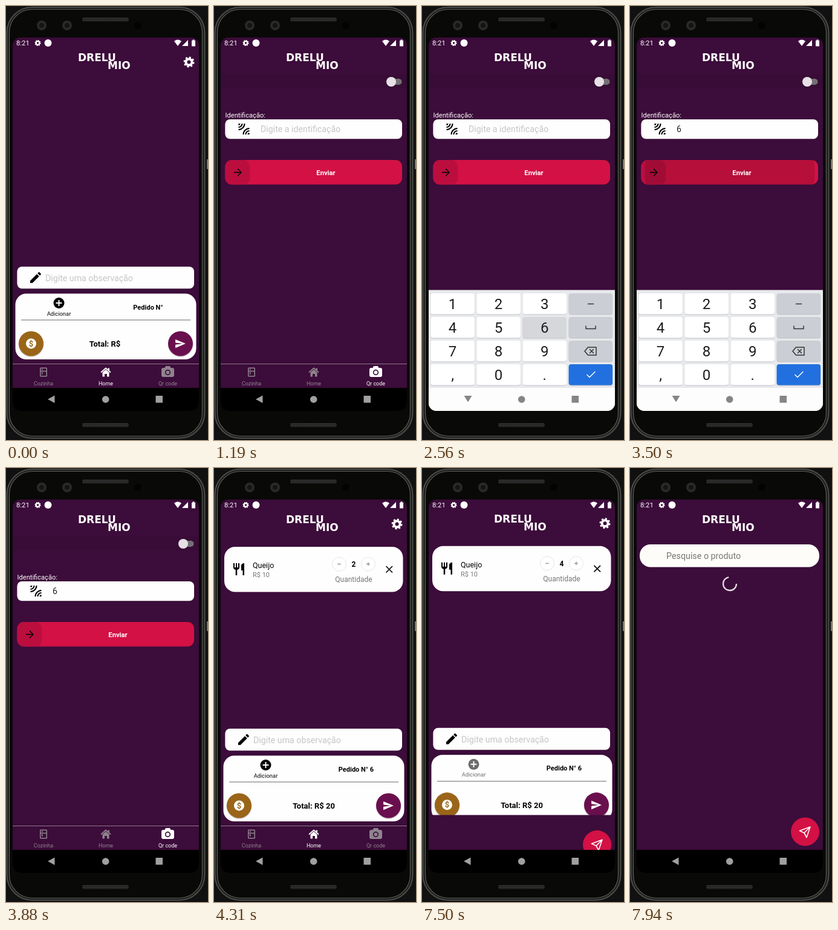
Animation of 334x716 px, one loop 8 s. Source, as an HTML page:

```html
<!DOCTYPE html>
<html lang="pt">
<head>
<meta charset="utf-8">
<title>Pedido</title>
<style>
html, body { margin: 0; width: 100%; height: 100%; overflow: hidden; background: #111; }
svg { display: block; width: 334px; height: 716px; font-family: Roboto, sans-serif; }
.mid { text-anchor: middle; }
.b { font-weight: 700; }
.hint { font-size: 14.2px; fill: #c6c6c6; }
.tab { font-size: 9px; color: #8f838e; fill: currentColor; }
.logo { font: 700 17px "DejaVu Sans", sans-serif; fill: #fff; }
.line { fill: none; stroke-linecap: round; stroke-linejoin: round; }
</style>
</head>
<body>
<svg viewBox="0 0 334 716">
  <defs>
    <clipPath id="screen"><rect x="11" y="52" width="308" height="616" rx="13"/></clipPath>
    <clipPath id="reveal"><rect id="revealBox" x="11" y="630" width="308" height="578"/></clipPath>
    <clipPath id="button"><rect x="18.500" y="254" width="292.500" height="40.500" rx="11"/></clipPath>
    <pattern id="mesh" width="3" height="3" patternUnits="userSpaceOnUse">
      <rect width="3" height="3" fill="#303030"/><rect width="1.500" height="1.500" fill="#141414"/>
    </pattern>
    <g id="logo" class="logo"><text x="119" y="91">DRELU</text><text x="168" y="104">MIO</text></g>
    <g id="gear" fill="none" stroke="#fff" stroke-width="4">
      <circle r="5"/><circle r="7.500" stroke-width="3" stroke-dasharray="2.945"/>
    </g>
  </defs>

  <rect x="332" y="253" width="2" height="16" fill="#777"/>
  <rect x="1.500" y="2" width="327" height="711" rx="42" fill="#1b1b1a" stroke="#4c4c49" stroke-width="2"/>
  <rect x="5.500" y="5.500" width="319" height="704" rx="38" fill="#090908" stroke="#5e5e5a" stroke-width="1.200"/>
  <rect x="126" y="19" width="77" height="6.500" rx="3" fill="url(#mesh)"/>
  <rect x="126" y="688" width="77" height="6.500" rx="3" fill="url(#mesh)"/>
  <g fill="#2a2a2a"><circle cx="59" cy="32" r="8"/><circle cx="101" cy="32" r="8"/></g>
  <g fill="#151515"><circle cx="59" cy="32" r="4"/><circle cx="101" cy="32" r="4"/></g>
  <circle cx="218" cy="32" r="6" fill="#030303"/>

  <g clip-path="url(#screen)">
    <rect x="11" y="52" width="308" height="616" fill="#3c0c3a"/>
    <g id="main">
      <use id="mainLogo" href="#logo"/>

      <g id="home">
        <use href="#gear" transform="translate(302.500 92.500)"/>
        <g id="item">
          <rect x="17" y="130" width="295.500" height="74.500" rx="18" fill="#fffefe"/>
          <path transform="translate(29 155)" d="M11 9H9V2H7v7H5V2H3v7c0 2.120 1.660 3.840 3.750 3.970V22h2.500v-9.030C11.340 12.840 13 11.120 13 9V2h-2v7zm5-3v8h2.500v8H21V2c-2.760 0-5 2.240-5 4z"/>
          <text x="64" y="165" font-size="12.500">Queijo</text>
          <g fill="#777"><text x="64" y="180" font-size="11">R$ 10</text><text class="mid" x="231" y="188" font-size="12">Quantidade</text></g>
          <g fill="#fff" stroke="#e6e6e6"><circle cx="207" cy="158.500" r="11.500"/><circle cx="255" cy="158.500" r="11.500"/></g>
          <path d="M204 158.500h6" stroke="#777"/>
          <path id="plus" d="M252 158.500h6m-3-3v6" stroke="#777"/>
          <text id="qty" class="b mid" x="231" y="163" font-size="12"></text>
          <path d="m284.500 162 10.500 10.500m0-10.500-10.500 10.500" stroke="#000" stroke-width="1.600"/>
        </g>
        <rect x="18.500" y="430.500" width="292.500" height="36" rx="8" fill="#8d8795"/>
        <rect x="18.500" y="430" width="292.500" height="36" rx="8" fill="#fffefe"/>
        <path transform="translate(37 436)" d="M3 17.250V21h3.750L17.810 9.940l-3.750-3.750L3 17.250zM20.710 7.040a1 1 0 0 0 0-1.410l-2.340-2.340a1 1 0 0 0-1.410 0l-1.830 1.830 3.750 3.750 1.830-1.830z"/>
        <text class="hint" x="65" y="454">Digite uma observação</text>

        <rect x="15.500" y="474.500" width="299" height="108.500" rx="18" fill="#fffefe"/>
        <g id="add">
          <circle cx="87.500" cy="490" r="9"/>
          <path d="M82.500 490h10m-5-5v10" stroke="#fff" stroke-width="2"/>
          <text class="mid" x="87.500" y="510.500" font-size="9.400">Adicionar</text>
        </g>
        <text id="order" class="b mid" x="235" y="500.500" font-size="11"></text>
        <path d="M25 518h280" stroke="#666"/>
        <g fill="#cfc8cc"><circle cx="41.500" cy="558" r="21"/><circle cx="288.500" cy="558" r="21"/></g>
        <circle cx="41.500" cy="557" r="20.500" fill="#9a6518"/>
        <circle cx="41.500" cy="557" r="8.500" fill="#fff"/>
        <text class="b mid" x="41.500" y="561.500" font-size="13" fill="#9a6518">$</text>
        <circle cx="288.500" cy="557" r="20.500" fill="#6a0f4e"/>
        <path transform="translate(278.500 547.500) scale(.8)" fill="#fff" d="M2 21 23 12 2 3v7l15 2-15 2z"/>
        <text id="total" class="b mid" y="562" font-size="13"></text>
      </g>

      <g id="qr">
        <rect x="11" y="113" width="308" height="23" fill="#380c37"/>
        <rect x="287" y="120" width="23.500" height="10" rx="5" fill="#737073"/>
        <circle cx="293" cy="125" r="8" fill="#e7e1e5"/>
        <text x="18.500" y="184" font-size="11.100" fill="#fff">Identificação:</text>
        <rect x="18.500" y="187.500" width="292.500" height="32" rx="8" fill="#8d8795"/>
        <rect x="18.500" y="187" width="292.500" height="32" rx="8" fill="#fffefe"/>
        <path transform="translate(37.500 191)" d="M6 3H3v3c1.660 0 3-1.340 3-3zm8 0h-2a9 9 0 0 1-9 9v2c6.080 0 11-4.930 11-11zm-4 0H8c0 2.760-2.240 5-5 5v2c3.870 0 7-3.130 7-7zm0 18h2a9 9 0 0 1 9-9v-2c-6.070 0-11 4.930-11 11zm8 0h3v-3c-1.660 0-3 1.340-3 3zm-4 0h2c0-2.760 2.240-5 5-5v-2c-3.870 0-7 3.130-7 7z"/>
        <text id="hint" class="hint" x="77" y="208">Digite a identificação</text>
        <text id="typed" x="77" y="208" font-size="14" fill="#222">6</text>
        <rect id="caret" y="193.500" width="1.600" height="19.500" fill="#4a6aa5"/>
        <g clip-path="url(#button)">
          <rect x="18" y="254" width="294" height="41" fill="#d31144"/>
          <rect x="18" y="254" width="41" height="41" rx="10" fill="#bb0e3f"/>
          <circle id="ripple" cx="165" cy="274" fill="#000" fill-opacity=".14"/>
        </g>
        <path class="line" d="M33.500 274.500h11m-5-5.500 5.500 5.500-5.500 5.500" stroke="#000" stroke-width="1.500"/>
        <text class="b mid" x="185" y="279" font-size="11.200" fill="#fff">Enviar</text>
      </g>

      <g id="tabs">
        <path d="M11 590.500h308" stroke="#8c7a8b"/>
        <g class="tab">
          <path transform="translate(53 595) scale(.75)" d="M18 2H6a2 2 0 0 0-2 2v16a2 2 0 0 0 2 2h12a2 2 0 0 0 2-2V4a2 2 0 0 0-2-2zm0 18H6v-9h12zm0-11H6V4h12zM8 5h2v3H8zm0 7h2v5H8z"/>
          <text class="mid" x="62" y="626">Cozinha</text>
        </g>
        <g id="homeTab" class="tab">
          <path d="M159.500 604.500l5.500-4.700 5.500 4.700v7H167v-4.500h-4v4.500h-3.500zM168.500 597.500h2.500v4l-2.500-2z"/>
          <path d="m157 604.500 8-7 8 7" fill="none" stroke="currentColor" stroke-width="1.700"/>
          <text class="mid" x="165" y="626">Home</text>
        </g>
        <g id="qrTab" class="tab">
          <rect x="257" y="597" width="21" height="15" rx="3"/><path d="m262 598 2-4h7l2 4z"/>
          <circle cx="267.500" cy="604.500" r="3.800" fill="none" stroke="#3c0c3a" stroke-width="1.700"/>
          <text class="mid" x="267.500" y="626">Qr code</text>
        </g>
      </g>
    </g>

    <g id="search" clip-path="url(#reveal)">
      <g id="searchBody">
        <rect x="11" y="52" width="308" height="602" fill="#3c0c3a"/>
        <use id="searchLogo" href="#logo"/>
        <rect x="16" y="126" width="297" height="37.500" rx="18" fill="#fdfcf8"/>
        <text x="60" y="150" font-size="14.300" fill="#777">Pesquise o produto</text>
        <circle id="spinner" cx="165" cy="191" r="11" pathLength="360" fill="none" stroke="#e4dce4" stroke-width="2.300"/>
        <circle cx="289.500" cy="600" r="23.500" fill="#d31144"/>
        <path class="line" d="m298 592-17.500 6.500 7.500 3.500 4 7.500zl-10 10" stroke="#fff" stroke-width="1.600"/>
      </g>
    </g>

    <g fill="#fff">
      <text x="17" y="65" font-size="11.300">8:21</text>
      <use href="#gear" transform="translate(52.500 61) scale(.57)"/>
      <circle cx="69.500" cy="61" r="6"/>
      <path d="M278 58q6-5 12 0l-6 8zM301 56v10h-10zM307 57h1.500v-1.500h3V57h1.500v9.500h-6z"/>
    </g>

    <rect id="navBar" x="11" y="630" width="308" height="38"/>
    <g id="keyboard">
      <rect id="panel" x="11" y="469" width="308" height="199" fill="#fdfdfd"/>
      <g id="keys"></g>
    </g>
    <g id="nav">
      <path id="back"/>
      <circle cx="164.700" cy="649" r="5.800"/><rect x="247.500" y="643" width="11.500" height="11.500"/>
      <path id="switcher" d="M291.500 646h12m-12 3h12m-10 3h8" stroke="#999" stroke-width="1.800" stroke-dasharray="1.500 1"/>
    </g>
  </g>
</svg>
<script>
const $ = id => document.getElementById(id);
const set = (id, attrs) => { for (const k in attrs) $(id).setAttribute(k, attrs[k]); };
const show = (id, on) => { $(id).style.display = on ? '' : 'none'; };
const ramp = (t, a, b) => Math.min(1, Math.max(0, (t - a) / (b - a)));
const within = (t, a, b) => t >= a && t < b;

const key = (label, i) => {
  const x = 14.3 + i % 4 * 76.1, y = 474 + Math.floor(i / 4) * 39;
  const fill = i === 15 ? '#2270df' : i % 4 === 3 ? '#cbced4' : '#fff';
  return `<rect x="${x}" y="${y + 1}" width="72.5" height="34.5" rx="4" fill="#bfc2c6"/>
    <rect id="key${i}" x="${x}" y="${y}" width="72.5" height="34.5" rx="4" fill="${fill}"/>
    <text class="mid" x="${x + 36.2}" y="${y + 26}" font-size="24" fill="#1d1d1f">${label}</text>`;
};
const labels = ['1', '2', '3', '', '4', '5', '6', '', '7', '8', '9', '', ',', '0', '.', ''];
$('keys').innerHTML = '<rect x="11" y="468.5" width="308" height="161.500" fill="#e8e9ec"/>' +
  labels.map(key).join('') +
  `<g class="line" stroke="#333" stroke-width="1.500">
    <path d="M274.500 491.500h9M271 528v4.500h16V528M269 569.500l5.500-6.500H288v13h-13.500zm8.500-3 6 6m0-6-6 6"/>
    <path d="m273 608.500 4 4 9-9" stroke="#fff"/></g>`;

function draw(t) {
  const onQr = within(t, 880, 4000), ordered = t >= 4000, typed = t >= 2690;

  // navigation and header
  show('home', !onQr);
  show('qr', onQr);
  $('homeTab').style.color = onQr ? '' : '#fff';
  $('qrTab').style.color = onQr ? '#fff' : '';
  set('mainLogo', { opacity: t < 880 ? 1 : onQr ? ramp(t, 880, 1190) : ramp(t, 4000, 4310) });

  // order form
  show('item', t >= 4125);
  $('qty').textContent = t < 6310 ? 2 : t < 6500 ? 3 : 4;
  set('plus', { opacity: within(t, 6310, 6630) ? .75 : 1 });
  $('order').textContent = ordered ? 'Pedido N° 6' : 'Pedido N°';
  $('total').textContent = ordered ? 'Total: R$ 20' : 'Total: R$';
  set('total', { x: ordered ? 165 : 163.5 });
  set('add', { transform: `translate(${ordered ? -2 : 0} 0)`, opacity: 1 - .8 * ramp(t, 7420, 7570) });

  // identification form
  show('hint', !typed);
  show('typed', typed);
  show('caret', within(t, 1690, 2190) || within(t, 2690, 3190));
  set('caret', { x: typed ? 86 : 77.5 });
  set('ripple', { r: 140 * ramp(t, 3430, 3500) + 30 * ramp(t, 3500, 3560), opacity: t < 3430 ? 0 : 1 - ramp(t, 3630, 3860) });

  // keyboard
  const open = within(t, 1750, 3810);
  const dy = 200 * (1 - ramp(t, 1750, 1970)) ** 3.6 + 200 * ramp(t, 3620, 3810) ** 2;
  show('keyboard', open);
  set('panel', { y: 469 + Math.max(0, dy - 8) });
  set('keys', { transform: `translate(0 ${dy})` });
  set('key6', { fill: within(t, 2560, 2690) ? '#d5d7db' : '#fff' });
  set('navBar', { fill: open ? '#fdfdfd' : '#000' });
  set('nav', { fill: open ? '#858585' : '#a0a0a0' });
  set('back', { d: open ? 'M69.500 643h13l-6.500 10.500z' : 'M69 648.800 80.500 642.500v12.600z' });
  show('switcher', within(t, 1750, 1940));
  show('tabs', !within(t, 1940, 3870));
  set('tabs', { transform: `translate(0 ${within(t, 1810, 1940) ? -154 : 0})` });

  // product search rises from the bottom
  const rise = 1 - (1 - ramp(t, 7490, 7915)) ** 4;
  show('search', t >= 7490);
  set('main', { transform: `translate(0 ${-11.6 * rise})` });
  set('revealBox', { y: 630 - 578 * rise });
  set('searchBody', { transform: `translate(0 ${23.7 * (1 - rise)})` });
  set('searchLogo', { opacity: ramp(t, 7500, 7810) });
  const sweep = 20 + 240 * ramp(t, 7540, 7940);
  set('spinner', {
    'stroke-dasharray': `${sweep} ${360 - sweep}`,
    transform: `rotate(${(t - 7940) * .25} 165 191)`
  });
}

function tick() {
  draw(performance.now() % 8000);
  requestAnimationFrame(tick);
}
tick();
</script>
</body>
</html>
```
